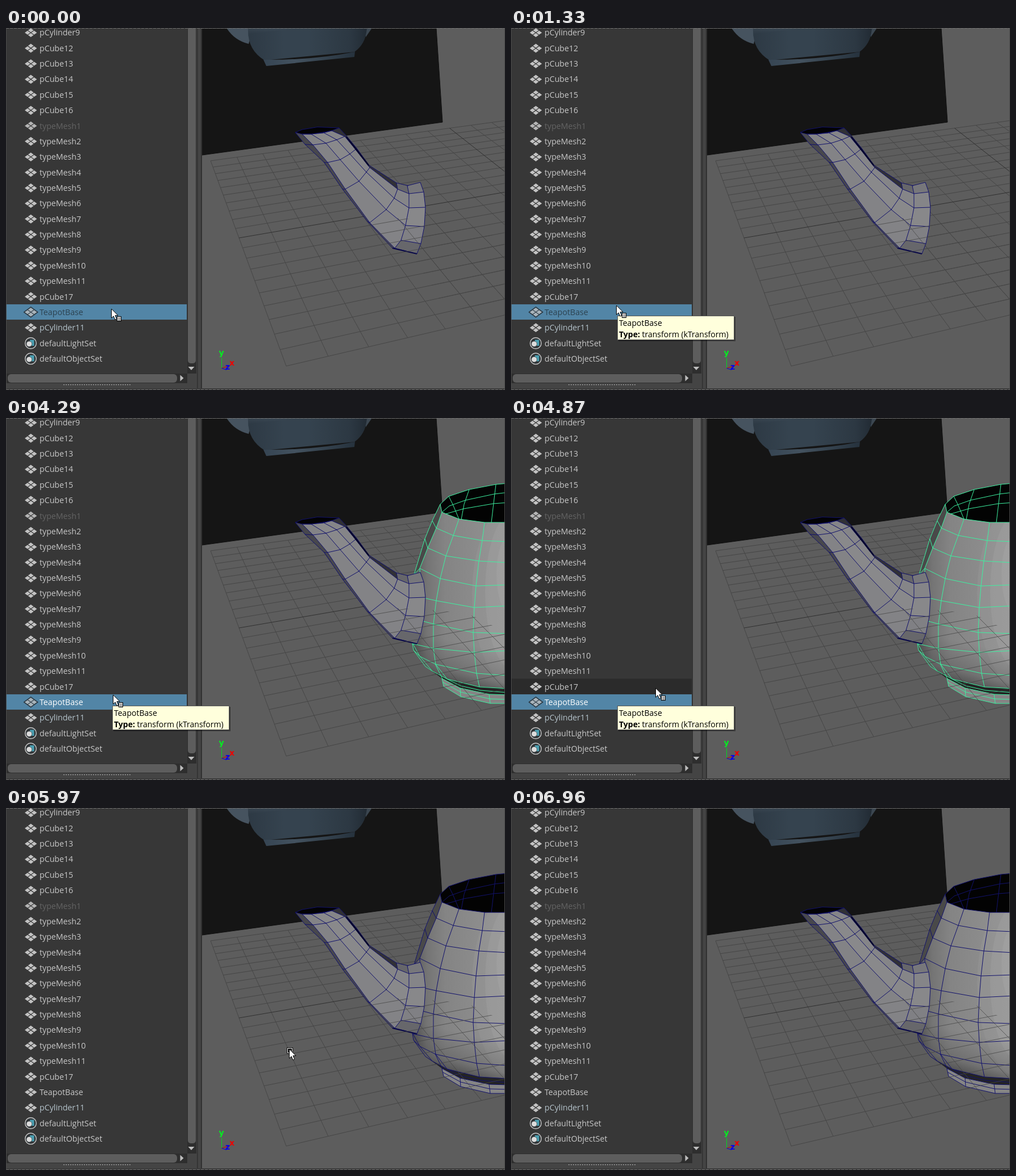
An HTML page for the animation above (7810 ms loop, 878 px wide and 638 px high).

```html
<!DOCTYPE html>
<html lang="en">
<head>
<meta charset="utf-8">
<title>Outliner and viewport</title>
<style>
html, body { margin: 0; width: 100%; height: 100%; overflow: hidden; background: #444; }
svg { display: block; width: 878px; height: 638px; }
text { font-family: "Open Sans", "Noto Sans", sans-serif; font-size: 14.2px; }
.axis text { font: bold 14px "DejaVu Sans", sans-serif; }
.tip text { font-size: 14px; fill: #000; }
</style>
</head>
<body>
<svg id="stage" viewBox="0 0 878 638" xmlns="http://www.w3.org/2000/svg"></svg>
<script>
const LOOP = 7810;
const stage = document.getElementById("stage");

const pts = s => s.trim().split(/\s+/).map(p => p.split(",").map(Number));
const poly = (p, attrs) => `<polygon points="${p.join(" ")}" ${attrs}/>`;
const line = (p, attrs = "") => `<polyline points="${p.join(" ")}" ${attrs}/>`;
const rect = (x, y, w, h, attrs) => `<rect x="${x}" y="${y}" width="${w}" height="${h}" ${attrs}/>`;
const column = (rows, i) => rows.map(r => r[i]);

// ---------- outliner ----------
const rowY = i => 8.3 + 27.36 * i;
const SELECTED = 18, HOVER = 17;
const meshes = n => Array.from({ length: n }, (_, i) => "typeMesh" + (i + 1));
const names = ["pCylinder9", "pCube12", "pCube13", "pCube14", "pCube15", "pCube16",
  ...meshes(11), "pCube17", "TeapotBase", "pCylinder11", "defaultLightSet", "defaultObjectSet"];

function meshIcon(y) {
  const dia = (dx, dy) => `M${43.7 + dx - 4.9} ${y + dy}l4.9 -3.5 4.9 3.5 -4.9 3.5z`;
  return `<path d="${dia(0, -4.3)}${dia(0, 4.3)}${dia(-5.8, 0)}${dia(5.8, 0)}"/>`;
}

function setIcon(y) {
  return `<circle cx="43.5" cy="${y}" r="9.8" fill="#303538" stroke="#c8c8c8" stroke-width="1.4"/>` +
    rect(42, y - 6, 7.5, 10.5, 'fill="#4aa0b2"') +
    `<circle cx="40.8" cy="${y + 1.3}" r="4.9" fill="#dcdcdc" stroke="#303538" stroke-width=".7"/>`;
}

function row(name, i) {
  const y = rowY(i), dim = name === "typeMesh1";
  const fill = dim ? "#646464" : name === "pCylinder11" ? "#b6c4cc" : "#c8c8c8";
  const icon = i > 19 ? setIcon(y) : `<g id="icon${i}" fill="${dim ? "#b5b5b5" : "#c3c3c3"}">${meshIcon(y)}</g>`;
  return icon + `<text id="name${i}" x="59" y="${y + 5.1}" fill="${fill}">${name}</text>`;
}

function outliner() {
  const y = rowY(SELECTED);
  let dots = "";
  for (let x = 101; x < 218; x += 4) dots += rect(x, 628, 2, 1.3, 'fill="#a0a0a0"');
  return rect(0, 0, 345, 638, 'fill="#444"') +
    rect(1, 1, 318, 608, 'fill="#373737"') +
    rect(319, 1, 16, 608, 'fill="#2e2e2e"') +
    rect(320, -10, 14, 601, 'rx="5" fill="#5d5d5d"') +
    rect(1, 609, 318, 17, 'fill="#2e2e2e"') +
    rect(3, 610, 298, 15, 'rx="6" fill="#5d5d5d"') +
    '<path d="M320.5 597h11l-5.5 6zM306.500 611.500v11l6-5.500z" fill="#bdbdbd"/>' +
    dots +
    rect(336, 0, 1.5, 636, 'fill="#303030"') + rect(343, 0, 1.5, 636, 'fill="#2b2b2b"') +
    `<rect id="hover" x="1" y="${rowY(HOVER) - 14}" width="317" height="27.400" fill="#2b2b2b"/>` +
    rect(1, Math.round(y - 14), 317, 27, 'id="bar" fill="#5285a6"') +
    `<path id="ring" d="M31 ${y}L43.700 ${y - 9.3} 56.400 ${y} 43.700 ${y + 9.3}z" fill="#33414c" stroke="#263540"/>` +
    names.map(row).join("");
}

// ---------- viewport ----------
// Perspective ground plane: u runs front to back, k counts cells to the right.
function ground(u, k) {
  const d = 1 - 0.398 * u + 0.0116 * k;
  return [(360 - 63.2 * u + 51.1 * k) / d, (234 + 124.7 * u - 3.7 * k) / d].map(v => v.toFixed(1));
}

function grid() {
  let s = "";
  for (let i = 0; i <= 20; i++) {
    const ink = `stroke="${i === 10 ? "#303030" : "#464646"}"`;
    s += line([ground(i / 20, 0), ground(i / 20, 20)], ink);
    s += line([ground(0, i), ground(1, i)], ink);
  }
  return `<g fill="none">${s}</g>`;
}

function backdrop() {
  return poly(pts("345,0 757,0 768,166 345,224"), 'fill="#151515" stroke="#101010"') +
    '<path d="M388 0Q402 22 427 28L434 0z" fill="#46535f"/>' +
    '<path d="M632 0L644 0 633 16z" fill="#3b4650"/>' +
    '<path d="M426 0Q424 38 455 57L613 42Q633 28 635 0z" fill="url(#potV)"/>' +
    '<path d="M426 0Q424 38 455 57L613 42Q633 28 635 0z" fill="url(#potH)"/>' +
    '<path d="M453 56Q540 57 614 42L613 51 458 67z" fill="url(#foot)"/>';
}

const body = [
  "764,152 767,166 797,178 842,184 884,184",
  "750,181 757,194 787,207 838,216 884,218",
  "737,213 742,229 774,243 832,252 884,255",
  "718,276 728,265 764,283 827,296 884,294",
  "718,300 730,316 757,322 824,334 884,331",
  "716,350 730,357 752,363 822,378 884,380",
  "715,397 716,398 752,406 824,413 884,410",
  "717,409 728,420 756,434 828,450 884,454",
  "738,438 750,446 776,460 833,474 884,477"
].map(pts);

function teapot() {
  const rimBack = pts("764,152 779,138 815,126 862,117 884,115");
  const rim = body[0];
  const baseTop = pts("767,459 799,476 850,487 884,488");
  const baseLow = pts("770,473 800,491 852,503 884,503");
  const last = body[8];
  const outline = [...rim, ...last.slice().reverse(), ...column(body, 0).reverse()];
  const wires = [
    ...body, ...[0, 1, 2, 3].map(i => column(body, i)), rimBack,
    pts("767,166 780,155 808,145 859,134 884,131"),
    pts("774,169 805,160 857,151 884,149"),
    pts("779,138 786,152 797,178"), pts("815,126 806,152 801,179"), pts("862,117 858,150 854,184"),
    baseTop, baseLow, pts("769,466 800,483 851,495 884,496"), pts("755,433 768,460"),
    pts("776,460 800,472 835,480 884,484"),
    ...[0, 1, 2].map(i => [baseTop[i], baseLow[i]])
  ];
  return '<g id="pot">' +
    poly([...rimBack, ...rim.slice().reverse()], 'fill="#030303"') +
    poly(outline, 'fill="url(#clay)"') +
    '<g clip-path="url(#bodyClip)">' +
    '<ellipse cx="905" cy="310" rx="85" ry="170" fill="#fff" opacity=".04"/>' +
    '<ellipse cx="895" cy="305" rx="52" ry="140" fill="#fff" opacity=".05"/>' +
    '<ellipse cx="888" cy="275" rx="25" ry="70" fill="#fff" opacity=".05"/></g>' +
    poly([...column(body, 0).slice(0, 4), ...column(body, 1).slice(0, 4).reverse()], 'fill="#494949"') +
    poly(outline, 'fill="url(#shade)"') +
    poly([last[0], ...last.slice(1), ...baseTop.slice().reverse()], 'fill="#242424"') +
    poly([...baseTop, ...baseLow.slice().reverse()], 'fill="#858585"') +
    `<g id="wire" fill="none">${wires.map(w => line(w)).join("")}</g></g>` +
    `<clipPath id="bodyClip">${poly(outline, "")}</clipPath>`;
}

function spout() {
  const front = [
    "521,187 537,187 558,184 573,181",
    "540,206 563,203 582,197 596,191",
    "566,237 588,232 605,222 615,214",
    "597,284 621,270 634,254 640,246",
    "640,343 669,320 683,300 689,284",
    "684,388 703,348 709,317 709,292"
  ].map(pts);
  const under = pts("509,184 526,205 560,237 592,284 636,341 680,388");
  const upper = pts("586,176 599,190 617,212 639,242 687,273 708,278");
  const left = column(front, 0), right = column(front, 3);
  const inner = pts("706,278 709,292 709,317 703,348 695,374 684,388");
  const outer = pts("729,272 735,289 738,316 736,350 730,380 723,398");
  const mouth = pts("509,184 521,179 548,174.5 586,176 573,181 558,185 537,187 521,187");
  let s = poly([...left, ...under.slice().reverse()], 'fill="#47474d"') +
    poly([...upper, ...right.slice().reverse()], 'fill="#303036"') +
    poly(pts("597,190 617,212 639,242 638,246 613,215"), 'fill="#08081c"') +
    poly([...left, inner[4], ...column(front, 1).reverse()], 'fill="#838386"');
  const tones = ["#838386", "#89898b", "#858588"];
  for (let r = 0; r < 5; r++) for (let c = 0; c < 3; c++) {
    const a = front[r], b = front[r + 1];
    s += poly([a[c], a[c + 1], b[c + 1], b[c]], `fill="${tones[c]}"`);
  }
  for (let i = 0; i < 5; i++) {
    const tone = ["#77777b", "#858588", "#88888a", "#808084", "#67676b"][i];
    s += poly([inner[i], outer[i], outer[i + 1], inner[i + 1]], `fill="${tone}"`);
  }
  s += poly([upper[4], inner[0], inner[1], right[4]], 'fill="#66666a"') + poly(mouth, 'fill="#020205"');
  const wires = [under, upper, inner, outer, ...front.slice(0, 5), [...mouth, mouth[0]],
    ...[0, 1, 2, 3].map(i => column(front, i)),
    ...inner.map((p, i) => [p, outer[i]]),
    [under[5], inner[5]], [upper[4], right[4]],
    ...[1, 2, 3, 4].map(i => [under[i], left[i]])];
  return s + `<g fill="none" stroke="#12126c">${wires.map(w => line(w)).join("")}</g>` +
    line(pts("680,388 723,398"), 'stroke="#0a0a48" stroke-width="2"') +
    line(pts("599,192 638,242"), 'stroke="#05052c" stroke-width="2.500"');
}

function gizmo() {
  return '<g class="axis">' +
    '<path d="M379.500 581V599.500" stroke="#00d820"/><path d="M379.500 599.500L393 595.500" stroke="#d00000"/>' +
    '<path d="M379.500 599.500L388 602.500" stroke="#0000e8"/>' +
    '<text x="374.500" y="577" fill="#00f020">y</text><text x="393" y="595" fill="#f00000">x</text>' +
    '<text x="386" y="602" fill="#0000f0">z</text></g>';
}

const stops = list => list.map(([o, c, a = 1]) => `<stop offset="${o}" stop-color="${c}" stop-opacity="${a}"/>`).join("");
const gradient = (id, box, list) => {
  const [x1, y1, x2, y2] = box;
  return `<linearGradient id="${id}" gradientUnits="userSpaceOnUse" x1="${x1}" y1="${y1}" x2="${x2}" y2="${y2}">${stops(list)}</linearGradient>`;
};

const defs = "<defs>" +
  gradient("potV", [0, 0, 6, 56], [[0, "#8d8883"], [0.4, "#77797a"], [0.72, "#4c5a68"], [1, "#35434f"]]) +
  gradient("potH", [426, 0, 636, 0], [[0, "#222b34", 0.4], [0.3, "#222b34", 0], [0.5, "#222b34", 0], [0.85, "#222b34", 0.45], [1, "#1c242c", 0.8]]) +
  gradient("foot", [454, 0, 614, 0], [[0, "#364553"], [0.35, "#43525f"], [1, "#26323d"]]) +
  gradient("clay", [716, 0, 878, 0], [[0, "#555"], [0.15, "#747474"], [0.35, "#848484"], [0.7, "#8c8c8c"], [1, "#929292"]]) +
  gradient("shade", [800, 395, 780, 480], [[0, "#000", 0], [0.6, "#000", 0.18], [1, "#000", 0.55]]) +
  '<clipPath id="view"><rect x="345" y="1" width="532" height="634"/></clipPath>' +
  '<clipPath id="below"><polygon points="640,341 690,335 773,340 822,349 877,376 877,506 770,490 715,400 680,388"/></clipPath>' +
  "</defs>";

const viewport = rect(345, 0, 533, 635, 'fill="#5d5d5d"') +
  `<g clip-path="url(#view)">${backdrop()}${grid()}${teapot()}${spout()}` +
  `<g clip-path="url(#below)" opacity=".75">${grid()}</g></g>` + gizmo();

const frame = rect(0, 635, 878, 3, 'fill="#3c3c3c"') +
  '<path d="M0 .5H878M0 637.500H878" stroke="#6c6c6c" stroke-dasharray="5 2"/>' +
  '<path d="M.5 0V638M877.500 0V638" stroke="#4a4a4a"/>';

const tip = '<g id="tip" class="tip">' + rect(189, 509, 206, 43, 'fill="#000" opacity=".4"') +
  rect(187.5, 507.5, 205, 42, 'fill="#ffffdc" stroke="#555"') +
  '<text x="190" y="525">TeapotBase</text>' +
  '<text x="190" y="545"><tspan font-weight="bold">Type:</tspan> transform (kTransform)</text></g>';

const arrow = '<path d="M.5 0V16.200L4.200 12.800 6.900 19 9.700 17.800 7 11.700 12 11.500z" fill="#fff" stroke="#000"/>';
const cursors = `<g id="listCursor">${arrow}` +
  rect(10.5, 13.5, 7, 8, 'fill="#eee" stroke="#000"') +
  '<path d="M12 16H16.500M12 18H16.500M12 20H16.500" stroke="#333" stroke-width=".8"/></g>' +
  '<g id="viewCursor">' + rect(-4, -3, 11, 11, 'fill="#111"') +
  rect(-2.5, -1.5, 8, 8, 'fill="#111" stroke="#eee"') + rect(0, 1, 3, 3, 'fill="#888"') + arrow + "</g>";

stage.innerHTML = defs + outliner() + viewport + frame + tip + cursors;

// ---------- timing ----------
// The pointer jumps between sampled positions: [time, x, y].
const path = [[0, 185, 495], [590, 185, 489], [4290, 188, 488], [4420, 196, 485], [4720, 238, 478],
  [4870, 254, 476], [4990, 308, 461], [5110, 375, 442], [5260, 453, 428], [5410, 494, 427],
  [5530, 498, 425], [6390, 536, 438], [6540, 660, 494], [6660, 832, 590], [6810, 832, 619]];

const el = id => document.getElementById(id);
const show = (id, on) => el(id).setAttribute("display", on ? "inline" : "none");
const within = (t, a, b) => t >= a && t < b;

function draw(t) {
  const shown = t >= 2960, selected = t < 5970;
  show("bar", selected);
  show("ring", selected);
  show("hover", within(t, 4720, 5110));
  show("tip", within(t, 1330, 5410));
  show("pot", shown);
  el("wire").setAttribute("stroke", selected ? "#3cf0a0" : "#12126c");
  el("name" + SELECTED).setAttribute("fill", !shown ? "#2c4250" : selected ? "#fff" : "#c8c8c8");
  el("icon" + SELECTED).setAttribute("fill", selected ? "#a9b4bb" : "#c3c3c3");

  const [, x, y] = path.filter(p => p[0] <= t).pop();
  const inView = t >= 5110;
  show("listCursor", !inView);
  show("viewCursor", within(t, 5110, 6960));
  el(inView ? "viewCursor" : "listCursor").setAttribute("transform", `translate(${x} ${y})`);
}

function tick() {
  draw(performance.now() % LOOP);
  requestAnimationFrame(tick);
}
tick();
</script>
</body>
</html>
```
